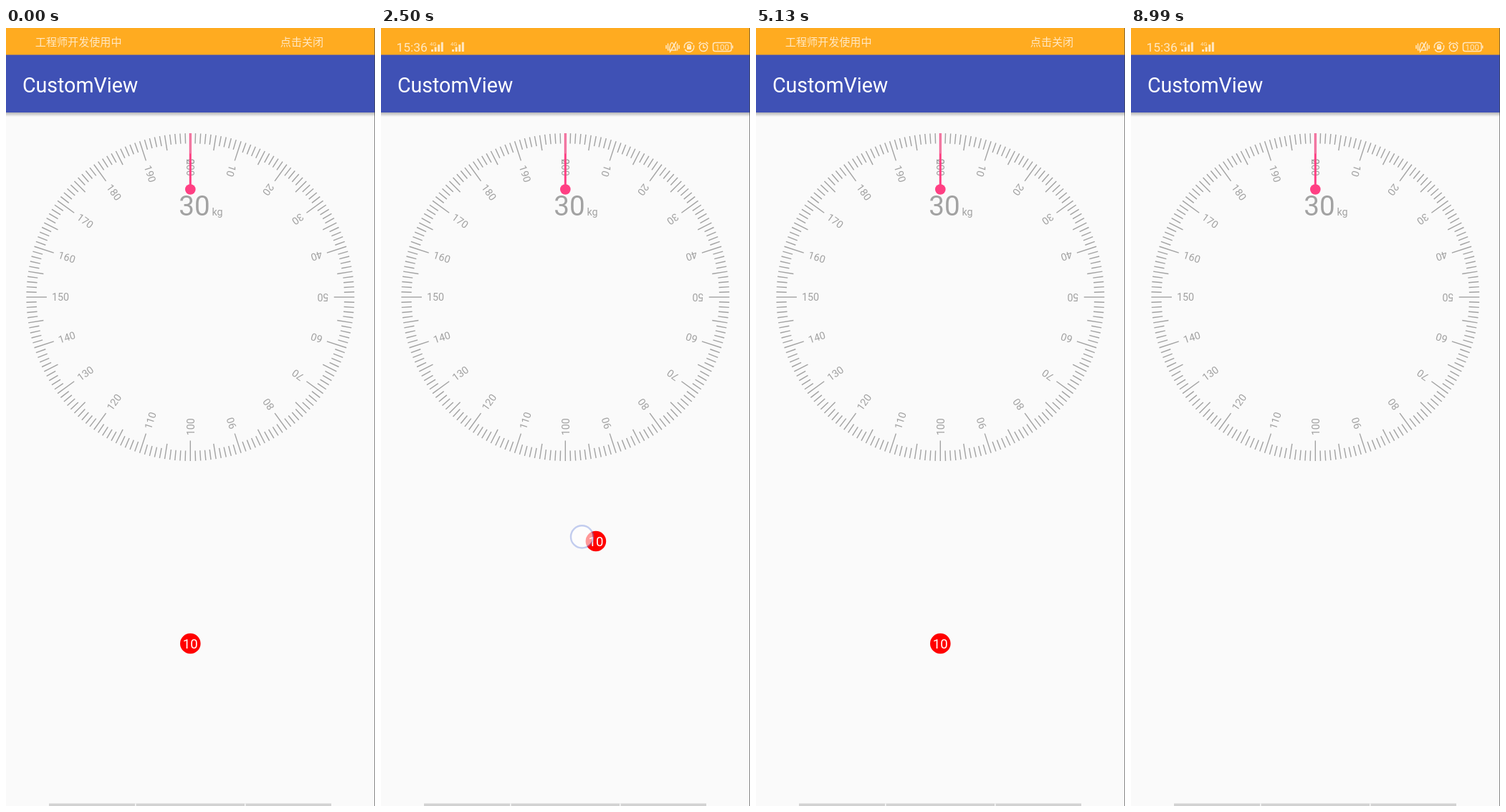
Write an HTML page with a canvas that moves like this. It is 515x1087 px and loops after 9030 ms.

```html
<!DOCTYPE html>
<html lang="en">
<head>
<meta charset="utf-8">
<title>CustomView</title>
<style>
html, body { margin: 0; width: 100%; height: 100%; overflow: hidden; background: #fafafa; }
canvas { display: block; }
</style>
</head>
<body>
<canvas id="stage" width="515" height="1087"></canvas>
<script>
const ctx = document.getElementById('stage').getContext('2d');
const LOOP = 9030, TAU = Math.PI * 2;
const GRAY = '#a2a2a2', PINK = '#ff3f83', RED = '#ff0000', CREAM = '#ffe8c4';
const HOME = { x: 257.3, y: 860 }, BADGE_R = 14.3, LAG = 40;

// Each drag: when the tether breaks, and the finger's turning points as [ms, x, y].
const circling = { tear: 1600, path: [
  [640, 257, 860], [1040, 285, 750], [1340, 211, 753], [1650, 117, 841], [1920, 270, 916],
  [2200, 400, 795], [2500, 281, 711], [2700, 175, 733], [2870, 240, 915], [3120, 395, 690],
  [3340, 414.5, 643], [3560, 378, 668], [4000, 190, 750], [4600, 257, 858]] };
const throwAway = { tear: 7260, path: [
  [6860, 257, 860], [7300, 240, 710], [7790, 300, 645], [8240, 335, 662]] };

const clamp = v => Math.min(1, Math.max(0, v));
const begins = drag => drag.path[0][0];
const ends = drag => drag.path[drag.path.length - 1][0];

// Smooth curve through timed points (Hermite with finite-difference slopes).
function follow(path, t) {
  const last = path.length - 1;
  let i = 0;
  while (i < last - 1 && t > path[i + 1][0]) i++;
  const a = path[i], b = path[i + 1], span = b[0] - a[0], u = clamp((t - a[0]) / span);
  const slope = (k, axis) => {
    if (k === 0 || k === last) return 0;
    const p = path[k - 1], n = path[k + 1];
    return (n[axis] - p[axis]) / (n[0] - p[0]) * span;
  };
  const at = axis => (1 + 2 * u) * (1 - u) ** 2 * a[axis] + u * (1 - u) ** 2 * slope(i, axis)
    + u * u * (3 - 2 * u) * b[axis] + u * u * (u - 1) * slope(i + 1, axis);
  return { x: at(1), y: at(2) };
}

function rect(x, y, w, h, fill) {
  ctx.fillStyle = fill;
  ctx.fillRect(x, y, w, h);
}

function disc(x, y, r, fill) {
  ctx.fillStyle = fill;
  ctx.beginPath();
  ctx.arc(x, y, r, 0, TAU);
  ctx.fill();
}

function line(x1, y1, x2, y2) {
  ctx.beginPath();
  ctx.moveTo(x1, y1);
  ctx.lineTo(x2, y2);
  ctx.stroke();
}

function ring(x, y, r, from = 0, to = TAU) {
  ctx.beginPath();
  ctx.arc(x, y, r, from, to);
  ctx.stroke();
}

function text(str, x, y, size, fill, align = 'left', family = 'Roboto, sans-serif') {
  ctx.font = size + 'px ' + family;
  ctx.textAlign = align;
  ctx.fillStyle = fill;
  ctx.fillText(str, x, y);
}

function drawBars() {
  rect(0, 0, 515, 1087, '#fafafa');
  const shade = ctx.createLinearGradient(0, 118, 0, 124);
  shade.addColorStop(0, 'rgba(0,0,0,.28)');
  shade.addColorStop(1, 'rgba(0,0,0,0)');
  rect(0, 118, 515, 6, shade);
  rect(0, 0, 515, 38, '#ffab20');
  rect(0, 37.5, 515, 80.5, '#3f51b5');
  text('CustomView', 22.9, 89.5, 28.6, '#fff');
  rect(60, 1083.5, 394, 4, '#d2d2d2');
  rect(180, 1083.5, 1.5, 4, '#fafafa');
  rect(333, 1083.5, 1.5, 4, '#fafafa');
  rect(514, 0, 1, 1087, 'rgba(60,60,60,.6)');
}

function drawNotice() {
  const cjk = '"Noto Sans CJK SC", "Noto Sans CJK", sans-serif';
  text('工程师开发使用中', 40.8, 25, 15.1, CREAM, 'left', cjk);
  text('点击关闭', 382.8, 25, 15.1, CREAM, 'left', cjk);
}

function drawSystemIcons() {
  ctx.strokeStyle = CREAM;
  ctx.lineWidth = 1.5;
  text('15:36', 21.5, 33, 17.4, CREAM);
  for (const x of [68, 97]) {
    text('4G', x, 25, 7.5, CREAM);
    for (let i = 0; i < 4; i++) rect(x + 2 + i * 4.6, 30 - i * 3.4, 3, 3 + i * 3.4, CREAM);
  }
  // Bell, struck through, with vibration marks on both sides
  ctx.beginPath();
  ctx.moveTo(402.5, 31);
  ctx.quadraticCurveTo(405, 10, 411.5, 31);
  ctx.closePath();
  ctx.stroke();
  line(403, 34, 412, 19);
  for (const side of [-1, 1]) {
    line(407 + side * 6.5, 21.5, 407 + side * 6.5, 31.5);
    line(407 + side * 9, 24, 407 + side * 9, 29);
  }
  // Rotation lock
  ring(430, 26.5, 6.8, -0.4, 2.6);
  ring(430, 26.5, 6.8, 2.9, 5.6);
  rect(427, 25.5, 6, 4.5, CREAM);
  ring(430, 25, 2);
  // Alarm clock
  ring(450, 27, 5.6);
  line(450, 23.5, 450, 28);
  line(450, 27.5, 453, 27.5);
  for (const side of [-1, 1]) line(450 + side * 6.5, 22, 450 + side * 3.5, 19.5);
  // Battery
  ctx.beginPath();
  ctx.roundRect(463.5, 20.5, 25.5, 12, 3);
  ctx.stroke();
  rect(490, 24.5, 1.5, 4, CREAM);
  text('100', 476.3, 30.8, 11.5, CREAM, 'center');
}

// The notice and the system icons swap every three seconds, through an empty bar.
function drawStatus(t) {
  const phase = (t + 1660) % 6000;
  const shown = clamp((Math.abs(phase % 3000 - 1500) - 1500 + 1460) / -260 + 5.615);
  ctx.globalAlpha = shown;
  if (phase < 3000) drawNotice();
  else drawSystemIcons();
  ctx.globalAlpha = 1;
}

function drawDial() {
  const cx = 257.3, cy = 376, r = 229;
  ctx.strokeStyle = GRAY;
  ctx.lineWidth = 1.4;
  for (let i = 0; i <= 200; i++) {
    const len = i % 10 === 0 ? 28.6 : i % 5 === 0 ? 21.5 : 14.3;
    ctx.save();
    ctx.translate(cx, cy);
    ctx.rotate(i / 200 * TAU + Math.PI / 2);
    line(-r, 0, len - r, 0);
    if (i % 10 === 0) text(String(i), -193.3, 5.2, 14.3, GRAY);
    ctx.restore();
  }
  ctx.strokeStyle = PINK;
  ctx.lineWidth = 3;
  line(cx, cy - r, cx, 225);
  disc(cx, 225.5, 7.3, PINK);
  ctx.strokeStyle = '#e39ab2';
  ctx.lineWidth = 1.2;
  line(cx, cy - r, cx, cy - r + 28.6);
  text('30', 241.2, 262.4, 38.6, GRAY);
  text('kg', 287.5, 262, 14.3, GRAY);
}

function drawTether(p) {
  const dx = p.x - HOME.x, dy = p.y - HOME.y, d = Math.hypot(dx, dy);
  const r = BADGE_R - d / 18.8;
  disc(HOME.x, HOME.y, r, RED);
  if (d < 1) return;
  const nx = -dy / d, ny = dx / d;
  const mx = (p.x + HOME.x) / 2, my = (p.y + HOME.y) / 2;
  ctx.beginPath();
  ctx.moveTo(HOME.x + nx * r, HOME.y + ny * r);
  ctx.quadraticCurveTo(mx, my, p.x + nx * BADGE_R, p.y + ny * BADGE_R);
  ctx.lineTo(p.x - nx * BADGE_R, p.y - ny * BADGE_R);
  ctx.quadraticCurveTo(mx, my, HOME.x - nx * r, HOME.y - ny * r);
  ctx.fill();
}

function drawBadge(p) {
  disc(p.x, p.y, BADGE_R, RED);
  text('10', p.x, p.y + 7, 18.6, '#fff', 'center');
}

function drawTouch(p) {
  disc(p.x, p.y, 15, 'rgba(255,255,255,.6)');
  ctx.strokeStyle = 'rgba(110,135,220,.4)';
  ctx.lineWidth = 2.4;
  ring(p.x, p.y, 15.6);
}

// The badge trails the finger, snaps home after the first drag and is gone after the second.
function drawBubble(t) {
  const drag = [circling, throwAway].find(d => t >= begins(d) + LAG / 2 && t < ends(d));
  if (drag) {
    const p = follow(drag.path, t - LAG);
    if (t < drag.tear) drawTether(p);
    drawBadge(p);
    drawTouch(follow(drag.path, t));
  } else if (t < ends(throwAway)) {
    drawBadge(HOME);
  }
}

const start = performance.now();
function frame() {
  const t = (performance.now() - start) % LOOP;
  drawBars();
  drawStatus(t);
  drawDial();
  drawBubble(t);
  requestAnimationFrame(frame);
}
frame();
</script>
</body>
</html>
```
